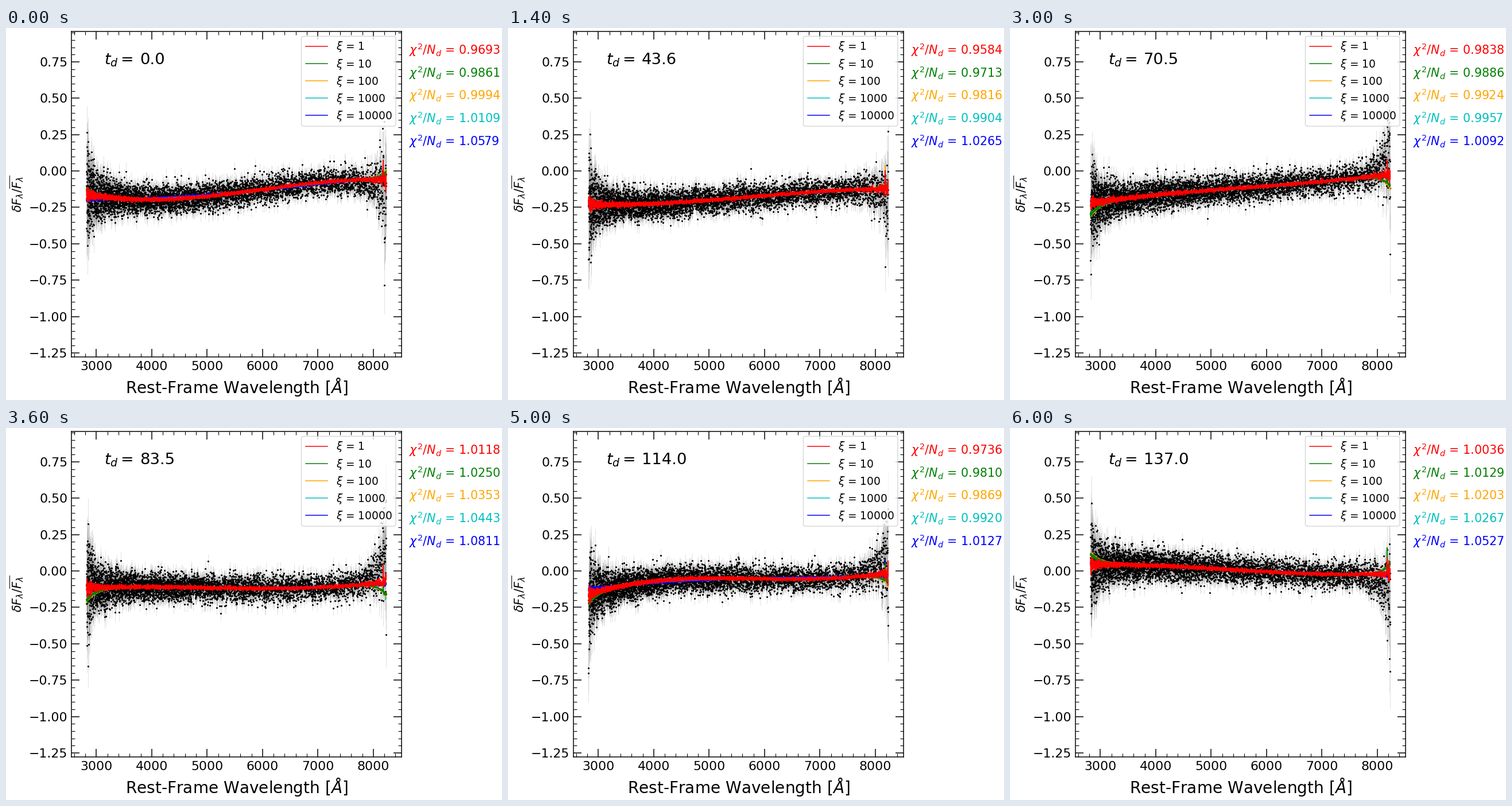
Recreate the animation shown at these times as a matplotlib script. Size 864x648 px, loop 6.2 s.

```python
import numpy as np
import matplotlib.pyplot as plt
from matplotlib.animation import FuncAnimation
from matplotlib.collections import LineCollection
from matplotlib.patches import FancyBboxPatch
from matplotlib.ticker import MultipleLocator
from numpy.polynomial.legendre import legval

W, H, DPI = 864, 648, 72
FRAMES, STEP = 31, 200
COLORS = ["r", "g", "orange", "c", "b"]
STIFF = np.array([0, .19, .34, .47, 1])     # how rigid each fit is

plt.rcParams["font.family"] = "DejaVu Sans"
plt.rcParams["mathtext.fontset"] = "dejavusans"

# Key epochs; the state in between is interpolated.
KEYS = [0, 7, 11, 15, 21, 25, 30]
DAY = [0.0, 43.6, 52.3, 70.5, 96.6, 114.0, 137.0]
CHI2 = [.9693, .9584, .9466, .9838, 1.0398, .9736, 1.0036]
SPREAD = [.0886, .0681, .0756, .0254, .1131, .0391, .0491]
DRIFT = [-.10, -.06, -.10, .18, .20, .15, -.15]
# Legendre coefficients of the spectrum: level, tilt, bow, twist.
SHAPE = [
    [-.137, -.182, -.204, -.118, -.103, -.062, .008],
    [.082, .066, .117, .090, -.076, .040, -.043],
    [.027, .005, .012, -.003, .033, -.023, .005],
    [-.032, -.013, -.045, .010, .016, .036, .013],
]

lam = 10 ** (np.log10(2824) + 1e-4 * np.arange(4648))
u = (lam - lam[0]) / (lam[-1] - lam[0])
dl, dr = lam - lam[0], lam[-1] - lam
sigma = (.051 - .007 * u + .09 * np.exp(-dl / 60) + .06 * np.exp(-dl / 280)
         + .14 * np.exp(-dr / 50) + .08 * np.exp(-dr / 220))
edges = np.exp(-dl / 200) * (1 - u) + np.exp(-dr / 150)
peak = np.exp(-((lam - 8178) / 4) ** 2)


def at(i, keys):
    return np.interp(i, KEYS, keys)


def curve(i, stiff=0):
    """Smooth spectrum; a stiff fit loses its bow and twist."""
    keep = 1 - stiff * np.array([0, 0, .3, 1])
    return legval(2 * u - 1, keep * [at(i, c) for c in SHAPE])


def fit(i, stiff, rng):
    noise = .035 + .105 * (stiff == 0)
    edge = -1.3 * at(i, DRIFT) * stiff ** .5 * (1 - stiff)
    return (curve(i, stiff) + edge * edges
            + noise * sigma * rng.standard_normal(lam.size)
            + rng.uniform(0, .16) * peak)


fig = plt.figure(figsize=(W / DPI, H / DPI), dpi=DPI, facecolor="white")
ax = fig.add_axes([114.3 / W, 75 / H, 574.5 / W, 567 / H])
ax.set_xlim(2554, 8507)
ax.set_ylim(-1.2776, .959)
ax.xaxis.set_major_locator(MultipleLocator(1000))
ax.xaxis.set_minor_locator(MultipleLocator(200))
ax.yaxis.set_major_locator(MultipleLocator(.25))
ax.yaxis.set_minor_locator(MultipleLocator(.05))
ax.yaxis.set_major_formatter("{x:.2f}")
ax.tick_params(which="both", direction="in", top=True, right=True)
ax.tick_params(which="major", length=14, width=1.5, labelsize=22, pad=7)
ax.tick_params(which="minor", length=6, width=1.1)
for spine in ax.spines.values():
    spine.set_linewidth(1.5)

bars = LineCollection([], colors="gray", linewidths=.8, alpha=.28, zorder=1)
ax.add_collection(bars, autolim=False)
dots, = ax.plot([], [], "o", color="k", ms=3.1, mew=0, zorder=2)
fits = [ax.plot([], [], color=c, lw=1.5, zorder=8 - k)[0]
        for k, c in enumerate(COLORS)]

# Overlay in pixel coordinates, y downwards.
top = fig.add_axes([0, 0, 1, 1], zorder=5)
top.set(xlim=(0, W), ylim=(H, 0))
top.axis("off")


def label(x, y, s, size, **kw):
    return top.text(x, y, s, fontsize=size, **{"va": "baseline", **kw})


label(401.75, 635.5, r"Rest-Frame Wavelength [$\AA$]", 28, ha="center")
label(19.5, 289, r"$\delta F_{\lambda}/\overline{F_{\lambda}}$", 21,
      ha="center", va="center", rotation=90)
label(171, 63, "$t_d =$", 27)
day = label(233, 63, "", 27.4)

top.add_patch(FancyBboxPatch((514.5, 14.5), 164.5, 156.5,
                             boxstyle="round,pad=0,rounding_size=3.8",
                             fc=(1, 1, 1, .8), ec=(.8, .8, .8, .8), lw=1.4))
chis = []
for k, c in enumerate(COLORS):
    y = 31.5 + 30.1 * k
    top.plot([522, 560], [y, y], color=c, lw=1.5)
    label(575, y + 7, rf"$\xi$ = {10 ** k}", 18.6)
    chis.append(label(701.5, 46 + 39.7 * k, "", 20.6, color=c))


def draw(i):
    rng = np.random.default_rng(100 + i)
    flux = (curve(i) + at(i, DRIFT) * np.exp(-dr / 200)
            + sigma * rng.standard_normal(lam.size))
    err = sigma * rng.uniform(.85, 1.15, lam.size)
    bars.set_segments(np.stack([np.column_stack([lam, flux - err]),
                                np.column_stack([lam, flux + err])], axis=1))
    dots.set_data(lam, flux)
    for line, stiff in zip(fits, STIFF):
        line.set_data(lam, fit(i, stiff, rng))
    day.set_text(f"{at(i, DAY):.1f}")
    for text, stiff in zip(chis, STIFF):
        chi2 = at(i, CHI2) + stiff * at(i, SPREAD)
        text.set_text(rf"$\chi^2/N_d$ = {chi2:.4f}")
    return [bars, dots, *fits, day, *chis]


anim = FuncAnimation(fig, draw, frames=FRAMES, interval=STEP,
                     repeat=True, repeat_delay=0, blit=False)
plt.show()
```
